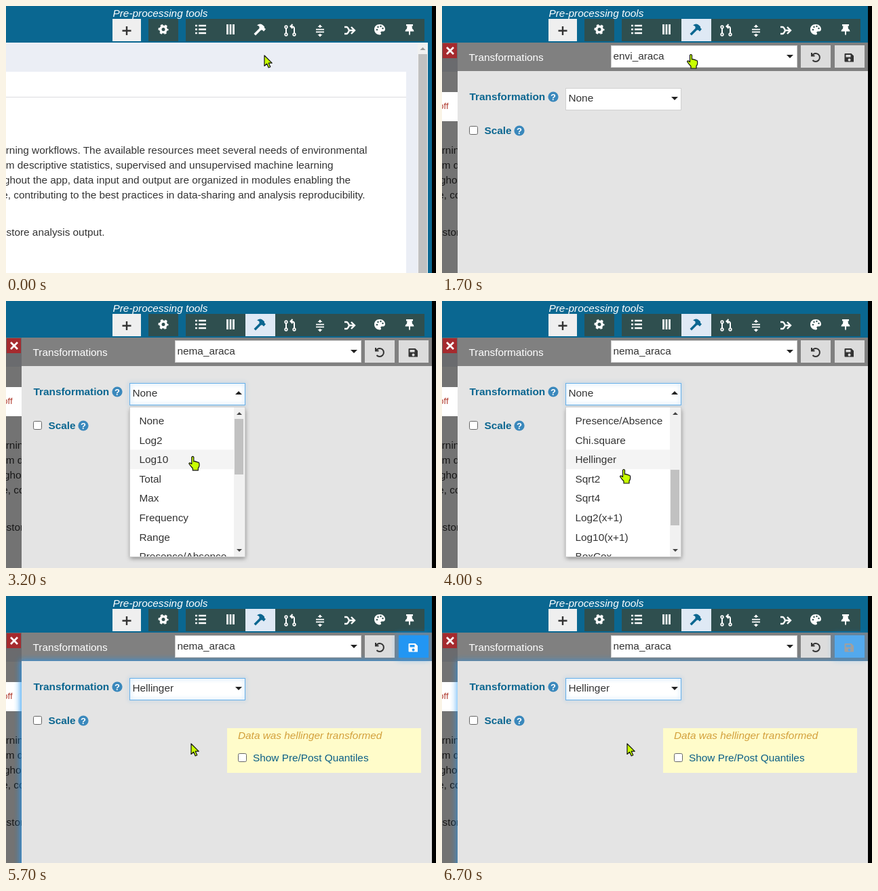
These frames come from a looping animation (634 px wide and 394 px high, 6.8 s). An HTML page:

```html
<!DOCTYPE html>
<html lang="en">
<head>
<meta charset="utf-8">
<title>Pre-processing tools</title>
<style>
  html, body { margin: 0; width: 100%; height: 100%; overflow: hidden; background: #000; }
  svg { display: block; font: 15.35px "Liberation Sans", Arial, sans-serif; }
  text { fill: #333; white-space: pre; }
  .white { fill: #fff; }
  .label { fill: #0b6690; font-weight: bold; }
  .end { text-anchor: end; }
  .line { fill: none; stroke: #fff; stroke-width: 2; }
  .box { fill: #fff; stroke: #666; }
  .field { fill: #fff; stroke: #d0d0d0; }
  .focus { fill: none; stroke: #66afe9; filter: drop-shadow(0 0 3px #66afe9); }
  .cursor { fill: #c8ff00; stroke: #111; stroke-width: 1.2; stroke-linejoin: round; }
</style>
</head>
<body>
<svg width="634" height="394" viewBox="0 0 634 394">
  <defs>
    <filter id="blur" x="-50%" y="-50%" width="200%" height="200%"><feGaussianBlur stdDeviation="5"/></filter>
    <filter id="shade" x="-10%" y="-10%" width="120%" height="120%"><feGaussianBlur stdDeviation="3"/></filter>
    <clipPath id="listClip"><rect x="183" y="157" width="169" height="220"/></clipPath>
    <clipPath id="stage"><rect width="628" height="394"/></clipPath>
    <g id="help">
      <circle r="7.6" fill="#3a88bc"/>
      <text y="4.6" text-anchor="middle" font-size="13" font-weight="bold" style="fill:#fff">?</text>
    </g>
  </defs>

  <g clip-path="url(#stage)">
    <!-- page -->
    <rect width="628" height="394" fill="#0a6791"/>
    <rect y="54" width="607" height="340" fill="#ebeef5"/>
    <rect y="97" width="590" height="297" fill="#fff"/>
    <path d="M0 134.5H590" stroke="#dcdce0"/>
    <rect x="607" y="54" width="15" height="340" fill="#f1f1f1"/>
    <rect x="608" y="71" width="13" height="323" fill="#c1c1c1"/>
    <path d="M610.5 65l4-4 4 4z" fill="#999"/>
    <g class="end">
      <text x="532.5" y="218">learning workflows. The available resources meet several needs of environmental</text>
      <text x="482.5" y="240">from descriptive statistics, supervised and unsupervised machine learning</text>
      <text x="508" y="262">Throughout the app, data input and output are organized in modules enabling the</text>
      <text x="529.5" y="284">e, contributing to the best practices in data-sharing and analysis reproducibility.</text>
      <text x="145.5" y="339">store analysis output.</text>
    </g>

    <!-- toolbar -->
    <text x="157.500" y="16" class="white" font-style="italic">Pre-processing tools</text>
    <rect x="157" y="19" width="42" height="33" fill="#efefef"/>
    <path d="M178 30v13M171.500 36.500h13" stroke="#333" stroke-width="2.400"/>
    <path d="M210 19h44v33h-44zM265 19h352v33h-352z" fill="#2f4f4f"/>
    <rect id="hammerButton" x="353" y="19" width="44" height="33"/>
    <g transform="translate(232 34.500)">
      <circle r="4.200" class="line" stroke-width="3" style="stroke-width:3.400"/>
      <circle r="6.300" class="line" style="stroke-width:2.400" stroke-dasharray="3.300" stroke-dashoffset="1.600"/>
    </g>
    <path d="M279 29h3m2 0h11M279 34.500h3m2 0h11M279 40h3m2 0h11" class="line" style="stroke-width:2.600"/>
    <path d="M326.500 27v15M331 27v15M335.500 27v15" class="line" style="stroke-width:2.800"/>
    <path id="hammer" d="M370 28.500q5-4 9 0l2 2v2l2 1.500-3 3.500-2-2h-2l-8 8-2.500-2.500 8-8v-2.500q-1-1.500-3.500-2z"/>
    <path d="M413 32v8M425 40v-7q0-3-5-3m2.500-3l-3 3 3 3" class="line"/>
    <g class="line" style="stroke-width:1.700"><circle cx="413" cy="31" r="1.800"/><circle cx="413" cy="42" r="1.800"/><circle cx="425" cy="42" r="1.800"/></g>
    <path d="M457 34.700h12M457 38.300h12M463 28v4M463 41v4" class="line" style="stroke-width:1.700"/>
    <path d="M459.500 31l3.500-3.500 3.500 3.500zM459.500 42l3.500 3.500 3.500-3.500z" class="white"/>
    <path d="M499 31h3q2 0 4 5h7M499 41h3q2 0 4-5M509 31l5 5-5 5" class="line" style="stroke-width:2.400"/>
    <path d="M551 27c5 0 8 3.500 8 7 0 3-2 3.500-4 3.500-3 0-3 1.500-2 3 .5 1.500-1 2-2 2-5 0-8-4-8-8s3-7.500 8-7.500z" class="white"/>
    <g fill="#2f4f4f"><circle cx="547" cy="35" r="1.200"/><circle cx="548.500" cy="31" r="1.200"/><circle cx="552.500" cy="30" r="1.200"/><circle cx="555.500" cy="33" r="1.200"/></g>
    <path d="M590 27h10v2.500h-1.500l.5 4q2.500 1.500 2.500 4h-5.500v4l-1 2-1-2v-4h-5.500q0-2.500 2.500-4l.5-4H590z" class="white"/>

    <!-- transformation panel -->
    <g id="panel">
      <rect y="54" width="23" height="340" fill="#000" opacity=".55"/>
      <rect y="127" width="23" height="43" fill="#fff"/>
      <text x="9.500" y="152" class="end" font-size="13" style="fill:#b03a2e">off</text>
      <rect x="1" y="55" width="21" height="22" fill="#a52a2e"/>
      <path d="M7 61l10 10M17 61l-10 10" class="line" style="stroke-width:2.800"/>
      <rect x="23" y="54" width="605" height="43" fill="#808080"/>
      <rect id="panelGlow" x="21" y="95" width="609" height="310" fill="#2196f3" filter="url(#blur)"/>
      <rect x="23" y="96" width="605" height="298" fill="#e4e4e4"/>
      <text x="39.500" y="81" class="white">Transformations</text>

      <rect x="249.500" y="58.500" width="274" height="32" class="field"/>
      <rect id="dataFocus" x="249.500" y="58.500" width="274" height="32" class="focus"/>
      <text id="dataName" x="252.500" y="79"></text>
      <path d="M508 72h10l-5 5z" fill="#222"/>

      <rect x="529" y="58" width="44" height="33" fill="#dcdcdc"/>
      <path d="M546 72.500a6 6 0 1 1 .5 7.500M545 69v4.500h4.500" class="line" style="stroke:#333"/>
      <rect id="saveGlow" x="577" y="56" width="48" height="37" fill="#2196f3" filter="url(#blur)"/>
      <rect id="saveButton" x="579" y="58" width="44" height="33"/>
      <path id="saveIcon" fill-rule="evenodd" d="M594.500 70h9l3.500 3.500v9h-12.500q-1 0-1-1v-10.500q0-1 1-1zM595.500 72v3.500h7v-3.500zM600.500 77.500a2 2 0 1 0 .1 0z"/>

      <text x="40.500" y="139" class="label">Transformation</text>
      <use href="#help" x="164" y="134"/>
      <rect x="182.500" y="121.500" width="170" height="32" class="field"/>
      <rect id="methodFocus" x="182.500" y="121.500" width="170" height="32" class="focus"/>
      <text id="methodName" x="186.500" y="141"></text>
      <path id="methodArrow" fill="#222"/>
      <rect x="40.500" y="177.500" width="12" height="12" rx="2" class="box"/>
      <text x="62.500" y="189" class="label">Scale</text>
      <use href="#help" x="114" y="184"/>

      <g id="message">
        <rect x="326" y="195" width="286" height="66" fill="#fffcca"/>
        <text x="342" y="211" font-style="italic" style="fill:#d3a03c">Data was hellinger transformed</text>
        <rect x="342.500" y="232.500" width="12" height="12" rx="2" class="box"/>
        <text x="364" y="244" style="fill:#0b5f86">Show Pre/Post Quantiles</text>
      </g>

      <g id="dataList">
        <rect x="249" y="94" width="275" height="67" fill="#0006" filter="url(#shade)"/>
        <rect x="249.500" y="91.500" width="274" height="67" class="field"/>
        <rect id="dataHover" x="250" width="273" height="28.600" fill="#f5f5f5"/>
        <text x="263" y="116">nema_araca</text>
        <text x="263" y="145">envi_araca</text>
      </g>

      <g id="methodList">
        <rect x="183" y="160" width="170" height="220" fill="#0006" filter="url(#shade)"/>
        <rect x="182.500" y="156.500" width="170" height="221" class="field"/>
        <g clip-path="url(#listClip)">
          <rect id="methodHover" x="183" width="153" height="28.600" fill="#f4f4f4"/>
          <g id="methods"></g>
        </g>
        <rect x="336" y="157" width="16" height="220" fill="#f1f1f1"/>
        <path d="M340 168l4-4 4 4zM340 366l4 4 4-4z" fill="#444"/>
        <rect id="thumb" x="337" width="13" height="82" fill="#c1c1c1"/>
      </g>
    </g>

    <g id="tooltip">
      <rect x="353" y="-3" width="93" height="23" rx="3"/>
      <text x="355.500" y="13" class="white" font-size="12" font-weight="bold">Transformation</text>
    </g>
    <circle id="ring" fill="none" stroke="#c4121c" stroke-width="1.300"/>
    <path id="arrow" class="cursor" d="M0 0v15.500l3.600-3.300 2.600 5.800 2.600-1.200-2.600-5.600h5z"/>
    <path id="hand" class="cursor" d="M-1.500 1.500q1.500-2 3 0v6.500l1-.5q1.500-.5 2 1 1.500-1 2.500.7 1.700-.7 2.500 1.300.8 5-1.500 7v3.500h-8v-3q-3-3-5.500-7 .5-2.500 4 .5z"/>
  </g>
</svg>

<script>
const LOOP = 6800, ROW = 28.6;
const METHODS = ["None", "Log2", "Log10", "Total", "Max", "Frequency", "Range", "Presence/Absence",
  "Chi.square", "Hellinger", "Sqrt2", "Sqrt4", "Log2(x+1)", "Log10(x+1)", "BoxCox", "YeoJohnson", "ExpoTrans"];

// time, x, y of the pointer tip
const PATH = [[0, 381, 73], [450, 381, 73], [900, 382, 46], [1200, 382, 46], [1600, 367, 71], [1850, 367, 71],
  [2250, 343, 112], [2400, 343, 112], [2500, 331, 116], [2600, 322, 132], [2800, 322, 132], [3300, 270, 240],
  [3700, 268, 248], [4450, 268, 248], [4900, 273, 218], [LOOP, 273, 218]];
const HAND_TIMES = [[750, 1250], [1450, 2450], [2550, 4500]];
const CLICKS = [[1050, 382, 47], [1850, 367, 74], [2350, 343, 112], [2750, 322, 134], [4150, 268, 248]];
const RING_LIFE = 240;

const el = {};
document.querySelectorAll("[id]").forEach(node => el[node.id] = node);
el.methods.innerHTML = METHODS.map((name, i) => `<text x="196.5" y="${182 + i * ROW}">${name}</text>`).join("");

const set = (id, attrs) => { for (const key in attrs) el[id].setAttribute(key, attrs[key]); };
const show = (id, on) => { el[id].style.display = on ? "" : "none"; };
const within = (t, from, to) => t >= from && t < to;
const clamp = v => Math.min(1, Math.max(0, v));
const smooth = v => v * v * (3 - 2 * v);
const mix = (a, b, k) => `rgb(${a.map((v, i) => Math.round(v + (b[i] - v) * k))})`;

function pointerAt(t) {
  const i = PATH.findIndex(p => p[0] > t);
  const [t0, x0, y0] = PATH[i - 1], [t1, x1, y1] = PATH[i];
  const k = smooth((t - t0) / (t1 - t0));
  return [x0 + (x1 - x0) * k, y0 + (y1 - y0) * k];
}

function draw(t) {
  const [x, y] = pointerAt(t);
  const hand = HAND_TIMES.some(([from, to]) => within(t, from, to));
  show("hand", hand);
  show("arrow", !hand);
  set(hand ? "hand" : "arrow", { transform: `translate(${x} ${y})` });

  const click = CLICKS.find(c => within(t, c[0], c[0] + RING_LIFE));
  show("ring", click);
  if (click) set("ring", { cx: click[1], cy: click[2], r: 26 - (t - click[0]) / 42 });

  const hover = within(t, 750, 1250), panelOpen = t >= 1250;
  show("tooltip", hover);
  show("panel", panelOpen);
  set("hammerButton", { fill: hover ? "#fff" : panelOpen ? "#dfe9f5" : "#2f4f4f" });
  set("hammer", { fill: hover || panelOpen ? "#0b6690" : "#fff" });

  show("dataList", within(t, 1900, 2450));
  show("dataFocus", within(t, 1900, 2750));
  set("dataHover", { y: y > 97 ? 97 : 125.6 });
  el.dataName.textContent = t < 2450 ? "envi_araca" : "nema_araca";

  const listOpen = within(t, 2800, 4250);
  const scroll = 7 * ROW * smooth(clamp((t - 3400) / 400));
  const row = Math.max(0, Math.floor((y - 4 - 162 + scroll) / ROW));
  show("methodList", listOpen);
  show("methodFocus", t >= 2800);
  set("methods", { transform: `translate(0 ${-scroll})` });
  set("methodHover", { y: 162.3 + row * ROW - scroll });
  set("thumb", { y: 174 + scroll * .375 });
  set("methodArrow", { d: listOpen ? "M338 138h10l-5-5z" : "M338 134h10l-5 5z" });
  el.methodName.textContent = t < 4250 ? "None" : "Hellinger";

  // unsaved-change pulse
  const phase = (t - 5130) / 1150 % 1;
  const glow = t < 5150 ? 0 : 1 - Math.abs(2 * phase - 1);
  show("message", t >= 5150);
  set("panelGlow", { opacity: glow * .9 });
  set("saveGlow", { opacity: glow * .6 });
  set("saveButton", { fill: mix([220, 220, 220], [33, 150, 243], glow) });
  set("saveIcon", { fill: mix([51, 51, 51], [255, 255, 255], glow * glow) });
}

const start = performance.now();
function tick() {
  draw((performance.now() - start) % LOOP);
  requestAnimationFrame(tick);
}
tick();
</script>
</body>
</html>
```
